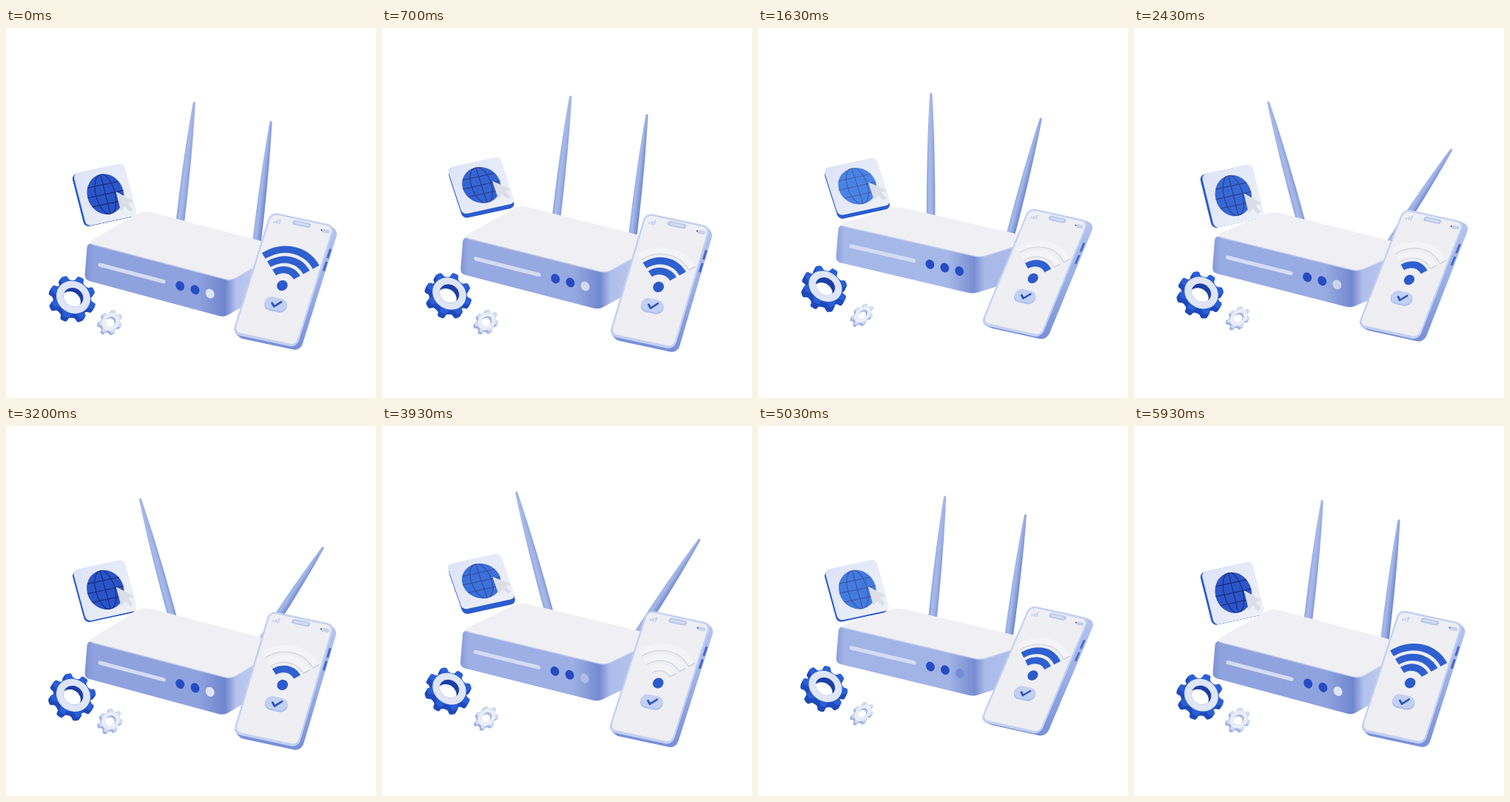
An HTML page with a canvas that plays this animation: 500 px wide and 500 px high, repeating every 6010 ms.

```html
<!DOCTYPE html>
<html lang="en">
<head>
<meta charset="utf-8">
<title>Wireless router</title>
<style>
  html, body { margin: 0; width: 100%; height: 100%; overflow: hidden; background: #fff; }
  canvas { display: block; width: 500px; height: 500px; }
</style>
</head>
<body>
<canvas id="stage" width="500" height="500"></canvas>
<script>
const ctx = document.getElementById('stage').getContext('2d');
const LOOP = 6010, FLOAT = LOOP / 2, TAU = Math.PI * 2;

const clamp = x => Math.max(0, Math.min(1, x));
const lerp = (a, b, k) => a + (b - a) * k;
const blend = (a, b, k) => a.map((v, i) => lerp(v, b[i], k));
const add = (a, b) => [a[0] + b[0], a[1] + b[1]];
const sub = (a, b) => [a[0] - b[0], a[1] - b[1]];
const rgb = c => `rgb(${c.map(Math.round).join()})`;

// Every floating part follows this wave, each with its own lag.
const sway = (t, lag) => Math.cos((t - lag) / FLOAT * TAU);
// Parts lit from above: 0 when lowest, 1 when highest.
const light = t => (1 - sway(t, 107)) / 2;
const ease = (t, from, to) => {
  const u = clamp((t - from) / (to - from));
  return u * u * (3 - 2 * u);
};

const BLUE = [38, 76, 196];

function fill(style) { ctx.fillStyle = style; ctx.fill(); }
function stroke(style, width) { ctx.strokeStyle = style; ctx.lineWidth = width; ctx.stroke(); }
function reset() { ctx.setTransform(1, 0, 0, 1, 0, 0); }

function gradient(x0, y0, x1, y1, stops) {
  const g = ctx.createLinearGradient(x0, y0, x1, y1);
  stops.forEach(([at, c]) => g.addColorStop(at, c));
  return g;
}

function disc(x, y, rx, style, ry = rx) {
  ctx.beginPath();
  ctx.ellipse(x, y, rx, ry, 0, 0, TAU);
  fill(style);
}

function box(x, y, w, h, r, style) {
  ctx.beginPath();
  ctx.roundRect(x, y, w, h, r);
  fill(style);
}

function line(points, style, width) {
  ctx.beginPath();
  points.forEach(p => ctx.lineTo(...p));
  stroke(style, width);
}

// Polygon whose corners are softened over a given length of each side.
function softPoly(points, cut) {
  const n = points.length;
  const toward = (p, q) => blend(p, q, Math.min(.5, cut / Math.hypot(...sub(q, p))));
  ctx.beginPath();
  points.forEach((p, i) => {
    ctx.lineTo(...toward(p, points[(i + n - 1) % n]));
    ctx.quadraticCurveTo(...p, ...toward(p, points[(i + 1) % n]));
  });
  ctx.closePath();
}

// Map a w by h card onto a slanted face; k pushes it back along the depth.
function plane({ tl, tr, bl, depth = [0, 0] }, w, h, k = 0) {
  const u = sub(tr, tl), v = sub(bl, tl);
  ctx.setTransform(u[0] / w, u[1] / w, v[0] / h, v[1] / h, tl[0] + depth[0] * k, tl[1] + depth[1] * k);
}

function slab(face, w, h, r, side) {
  for (let k = 1; k > 0; k -= .125) {
    plane(face, w, h, k);
    box(0, 0, w, h, r, side);
  }
  plane(face, w, h);
}

function routerShape(t) {
  const near = sway(t, 107), far = sway(t, -430);
  const left = [109.5 + .5 * near, 278 + 12.4 * near];
  const front = [302 + 2 * near, 325.3 + 16 * near];
  const back = [187 - near, 243 + 5 * far];
  const right = add(back, sub(front, left));
  const down = [-9.5, 50];
  return { left, front, back, right, leftLow: add(left, [-4, 50]),
    frontLow: add(front, down), rightLow: add(right, down) };
}

function mast([x, y], degrees, len, tones) {
  reset();
  ctx.translate(x, y);
  ctx.rotate(degrees * Math.PI / 180);
  ctx.beginPath();
  ctx.moveTo(-5.8, 8);
  ctx.quadraticCurveTo(-6, -len * .55, -1.6, -len + 2);
  ctx.quadraticCurveTo(0, -len - 1.5, 1.6, -len + 2);
  ctx.quadraticCurveTo(6, -len * .55, 5.8, 8);
  fill(gradient(-6, 0, 6, 0, tones.map((c, i) => [i / (tones.length - 1), c])));
}

function drawMasts(t, { back, right }) {
  const open = ease(t, 1180, 2470) - ease(t, 3930, 5205), rise = 3 * light(t);
  mast(add(blend(back, right, .256), [-11 * open, 0]),
    lerp(6.7, -15.3, open), 161 + rise + 5 * open, ['#8ba1dc', '#a9baea', '#9db0e4', '#7f97d6']);
  mast(add(blend(back, right, .79), [11 * open, 0]),
    lerp(6.7, 33, open), 162 + rise - 17 * open, ['#9aade2', '#a6b8e8', '#879edb', '#6b84ca']);
}

function drawRouter(t, { left, front, back, right, leftLow, frontLow, rightLow }) {
  reset();
  const k = light(t);
  const tone = blend([143, 162, 222], [166, 184, 232], k);
  const side = blend([194, 207, 242], [170, 187, 234], k);
  const dark = blend(tone, [84, 108, 192], .55);
  const x0 = leftLow[0], span = 240, edge = (frontLow[0] + 4 - x0) / span;

  softPoly([left, front, right, rightLow, frontLow, leftLow], 7);
  fill(gradient(x0, 0, x0 + span, 0, [
    [0, rgb(blend(tone, dark, .6))], [.05, rgb(tone)], [edge - .16, rgb(tone)],
    [edge - .01, rgb(dark)], [edge + .05, rgb(blend(tone, side, .7))], [1, rgb(side)]]));

  const lid = [left, back, right, front];
  softPoly(lid.map(p => add(p, [0, 1.5])), 9);
  fill('rgba(205,214,242,.8)');
  softPoly(lid, 9);
  fill('#f0f0f4');

  plane({ tl: left, tr: front, bl: leftLow }, 192, 50);
  ctx.lineCap = 'round';
  line([[19, 25], [104, 25]], '#d5ddf4', 5.2);
  const blink = k ** 2.5;
  for (let i = 0; i < 3; i++) {
    disc(126 + 20 * i, 25, 5.9, rgb(i < 2 ? BLUE : blend([224, 229, 244], BLUE, blink)), 6.3);
  }
}

function drawTile(t) {
  const s = sway(t, -370), k = light(t);
  const face = { tl: [89.7 + 2 * s, 193 + 6 * s], tr: [159, 178 + 6.5 * s],
    bl: [109, 259 + 12 * s], depth: [-1 - 2.5 * s, 4 - 3.5 * s] };
  slab(face, 72, 72, 7, '#2c5ccf');
  box(-.5, -.5, 73, 73, 7, gradient(0, 0, 72, 72, [[0, '#dde3f7'], [1, '#eff1f8']]));

  ctx.translate(36.5, 35.5);
  const rx = 25.5, ry = 27.5, ink = rgb(blend([24, 40, 120], [72, 90, 165], k));
  disc(0, 0, rx, rgb(blend([42, 84, 200], [72, 132, 230], k)), ry);
  ctx.save();
  ctx.clip();
  ctx.beginPath();
  ctx.ellipse(0, 0, rx * .52, ry, 0, 0, TAU);
  ctx.moveTo(0, -ry);
  ctx.lineTo(0, ry);
  for (const v of [-.48, 0, .48]) {
    ctx.moveTo(-rx, v * ry);
    ctx.lineTo(rx, v * ry);
  }
  stroke(ink, 1.1);
  ctx.restore();

  ctx.translate(.5 - s / 2, 1.5 * (s - 1));
  softPoly([[15, 0], [36, 18], [27, 19], [32, 28], [27, 31], [22, 22], [15, 28]], 1);
  fill('#dcdee6');
}

// One arc of the signal sign; 0 is the innermost.
function drawBand(i, on) {
  const r0 = 17 + 14 * i, r1 = r0 + 9.5, half = .82, up = -TAU / 4;
  const end = r => [r * Math.sin(half), -r * Math.cos(half)];
  const band = style => {
    ctx.beginPath();
    ctx.arc(0, 0, r1, up - half, up + half);
    ctx.arc(0, 0, r0, up + half, up - half, true);
    fill(style);
  };
  band('#f4f4f7');
  ctx.beginPath();
  ctx.arc(0, 0, r0, up - half, up + half);
  stroke('#d5d8e2', 1.5);
  line([end(r0), end(r1)], '#cfd3e0', 1.8);
  ctx.globalAlpha = on;
  band('#2f60d0');
  ctx.globalAlpha = 1;
}

function drawPhone(t) {
  const s = sway(t, 450);
  const face = { tl: [361 - 6 * s, 246 + 4 * s], tr: [446 - 2 * s, 264.5 + 4.5 * s],
    bl: [303.5 + 3.5 * s, 408 + 9 * s], depth: [6 - 2 * s, 4 + s] };
  slab(face, 90, 172, 10, gradient(0, 0, 0, 172, [[0, '#b4c4f0'], [.5, '#98aee6'], [1, '#7890d8']]));

  ctx.lineCap = 'butt';
  plane(face, 90, 172, .6);
  for (const y of [30, 48]) line([[90, y], [90, y + 13]], '#4468cc', 3);

  plane(face, 90, 172);
  box(0, 0, 90, 172, 10, '#c3d0f2');
  box(2.4, 2.4, 85.2, 166, 8, '#eeeef3');

  for (let i = 0; i < 3; i++) box(8 + i * 3.4, 11 - 2 * i, 2.4, 3 + 2 * i, .6, '#c9d3f0');
  box(33, 4, 25, 6.5, 3.2, '#b5c5ec');
  box(35.5, 5.6, 20, 3.2, 1.6, '#d3dcf3');
  box(75, 7.5, 10, 5, 1.5, '#c6d1ee');
  disc(74, 9.6, 1.1, '#4a5578');

  ctx.save();
  ctx.translate(45.5, 94);
  [3420, 1080, 380].forEach((off, i) => {
    const back = 4200 + 550 * i;
    drawBand(i, 1 - ease(t, off, off + 180) + ease(t, back, back + 180));
  });
  disc(0, 0, 7.2, '#2c5acb');
  ctx.restore();

  box(29.5, 112.5, 31, 18, 9, '#a9bdee');
  box(29.5, 111.5, 30, 17, 8.5, '#c3d0f3');
  ctx.lineCap = ctx.lineJoin = 'round';
  line([[39.5, 120], [43.5, 124], [51, 116]], '#2d55bc', 2.8);
}

function gearPath(r, root, teeth, turn) {
  const points = [];
  for (let i = 0; i < teeth; i++) {
    for (const [off, rad] of [[-.27, root], [-.19, r], [.19, r], [.27, root]]) {
      const a = turn + (i + off) / teeth * TAU;
      points.push([rad * Math.cos(a), rad * Math.sin(a)]);
    }
  }
  softPoly(points, r * .09);
}

function drawGear(t, { at, r, teeth, squash, tilt, depth, side, top, face, wall }) {
  const turn = TAU / 16 + t / LOOP * TAU, hole = r * .43;
  const place = k => {
    reset();
    ctx.translate(at[0] + depth[0] * k, at[1] + depth[1] * k);
    ctx.rotate(tilt);
    ctx.scale(1, squash);
    ctx.rotate(-tilt);
  };
  for (let k = 1; k >= 0; k -= .125) {
    place(k);
    gearPath(r, r * .78, teeth, turn);
    fill(k > 0 ? side : top);
  }
  disc(0, 0, r * .74, face);
  disc(0, 0, hole, wall);
  ctx.save();
  ctx.clip();
  place(1);
  disc(0, 0, hole, '#fff');
  ctx.restore();
}

function drawGears(t) {
  const big = sway(t, 107), small = sway(t, 300);
  drawGear(t, { at: [91, 356.5 + 7.5 * big], r: 32, teeth: 8, squash: .86 + .04 * big, tilt: .6,
    depth: [-3.5, 6 - big], side: '#1f4abb', top: '#2a5fd6', face: '#dfe5f7', wall: '#1c3fa6' });
  drawGear(t, { at: [141.5, 392.5 + 5.6 * small], r: 17.5, teeth: 7, squash: .77 + .1 * small, tilt: -.75,
    depth: [-2, 2.5], side: '#9db0e2', top: '#d3dbf2', face: '#ebeef7', wall: '#a3b5e4' });
}

function draw(t) {
  reset();
  ctx.fillStyle = '#fff';
  ctx.fillRect(0, 0, 500, 500);
  const router = routerShape(t);
  drawMasts(t, router);
  drawRouter(t, router);
  drawTile(t);
  drawPhone(t);
  drawGears(t);
}

// Twenty pictures a second, held 30 and 70 ms in turn.
const held = t => Math.min(5950, Math.floor(t / 100) * 100 + (t % 100 < 30 ? 0 : 50));

const start = performance.now();
function tick() {
  draw(held((performance.now() - start) % LOOP));
  requestAnimationFrame(tick);
}
tick();
</script>
</body>
</html>
```
